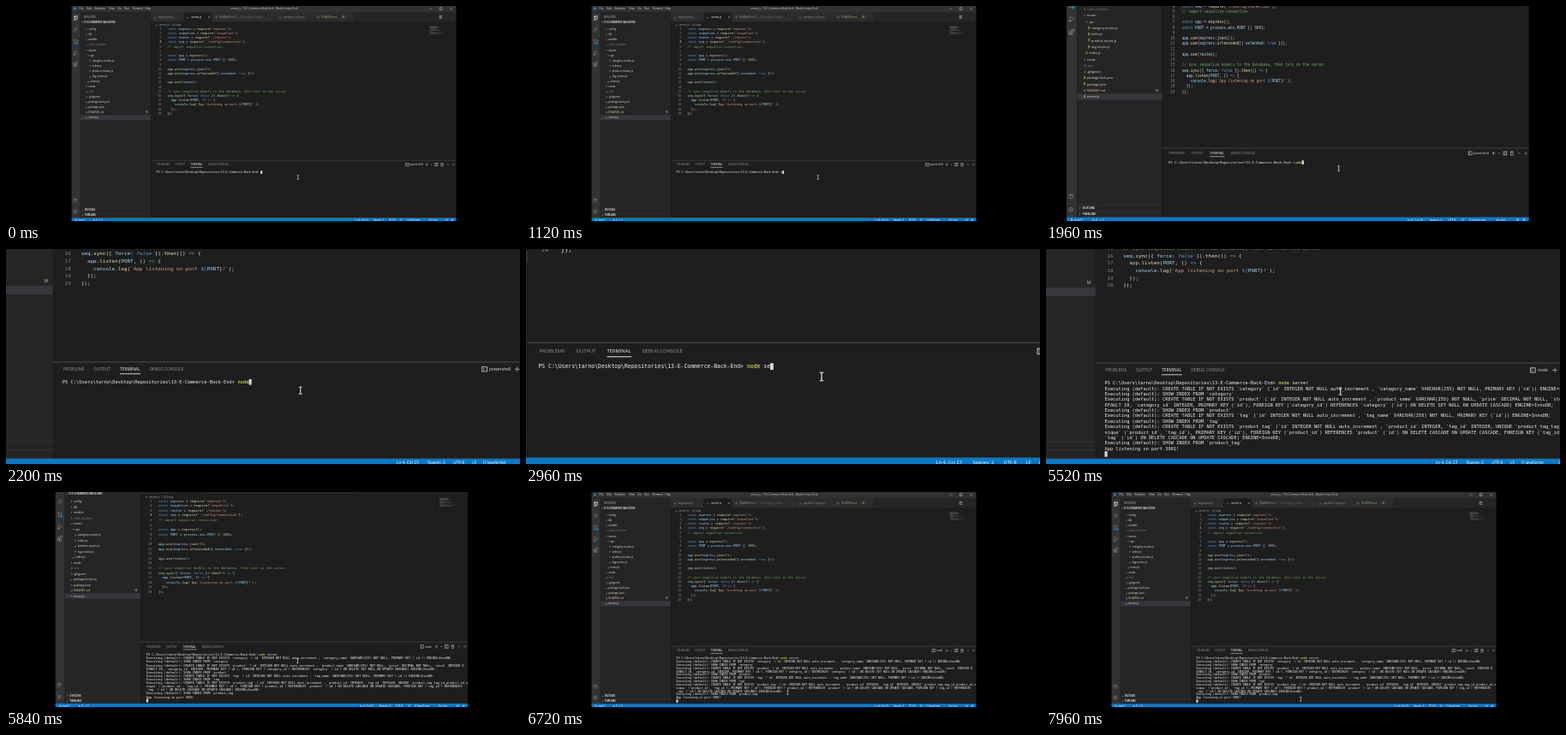
An HTML page with a canvas for the animation above (8000 ms loop, 600 by 251 pixels).

```html
<!DOCTYPE html>
<html lang="en">
<head>
<meta charset="utf-8">
<title>Editor and terminal</title>
<style>
html, body { margin: 0; width: 100%; height: 100%; overflow: hidden; background: #000; }
canvas { display: block; width: 600px; height: 251px; }
</style>
</head>
<body>
<canvas id="stage" width="600" height="251"></canvas>
<script>
const ctx = document.getElementById("stage").getContext("2d");
const LOOP = 8000;
const SANS = '"Open Sans", sans-serif';
const MONO = '"DejaVu Sans Mono", monospace';
const MONO_ADVANCE = 0.602;
const PROMPT = "PS C:\\Users\\tarno\\Desktop\\Repositories\\13-E-Commerce-Back-End> ";
const COMMAND = "node server";
const KEY_TIMES = [1120, 1320, 1520, 1720, 2520, 2680, 2840, 3160, 3400, 3640, 3960];
const ENTER = 4200, OUTPUT = 4720;
const CODE_SIZE = 3.54, TERM_SIZE = 3.21, TERM_LINE = 3.84;

const CODE = [
  "const express = require('express');",
  "const sequelize = require('sequelize');",
  "const routes = require('./routes');",
  "const seq = require('./config/connection');",
  "// import sequelize connection",
  "",
  "const app = express();",
  "const PORT = process.env.PORT || 3001;",
  "",
  "app.use(express.json());",
  "app.use(express.urlencoded({ extended: true }));",
  "",
  "app.use(routes);",
  "",
  "// sync sequelize models to the database, then turn on the server",
  "seq.sync({ force: false }).then(() => {",
  "  app.listen(PORT, () => {",
  "    console.log(`App listening on port ${PORT}!`);",
  "  });",
  "});"
];

const RUN = "Executing (default): ";
const CREATE = RUN + "CREATE TABLE IF NOT EXISTS ";
const ID = " (`id` INTEGER NOT NULL auto_increment , ";
const NAME_END = "_name` VARCHAR(255) NOT NULL, ";
const CASCADE = "ON DELETE CASCADE ON UPDATE CASCADE";
const ENGINE = ") ENGINE=InnoDB;";
const LOG = [
  CREATE + "`category`" + ID + "`category" + NAME_END + "PRIMARY KEY (`id`)" + ENGINE,
  RUN + "SHOW INDEX FROM `category`",
  CREATE + "`product`" + ID + "`product" + NAME_END + "`price` DECIMAL NOT NULL, `stock` INTEGER D",
  "EFAULT 10, `category_id` INTEGER, PRIMARY KEY (`id`), FOREIGN KEY (`category_id`) REFERENCES `category` (`id`) ON DELETE SET NULL ON UPDATE CASCADE" + ENGINE,
  RUN + "SHOW INDEX FROM `product`",
  CREATE + "`tag`" + ID + "`tag" + NAME_END + "PRIMARY KEY (`id`)" + ENGINE,
  RUN + "SHOW INDEX FROM `tag`",
  CREATE + "`product_tag`" + ID + "`product_id` INTEGER, `tag_id` INTEGER, UNIQUE `product_tag_tag_id_product_id_u",
  "nique` (`product_id`, `tag_id`), PRIMARY KEY (`id`), FOREIGN KEY (`product_id`) REFERENCES `product` (`id`) " + CASCADE + ", FOREIGN KEY (`tag_id`) REFERENCES ",
  "`tag` (`id`) " + CASCADE + ENGINE,
  RUN + "SHOW INDEX FROM `product_tag`",
  "App listening on port 3001!"
];

// [indent level, kind, label]; kinds: > closed folder, v open folder, j script, i info, o other
const TREE = [
  [0, ">", "config"], [0, ">", "db"], [0, ">", "models"], [0, ">", "node_modules"],
  [0, "v", "routes"], [1, "v", "api"], [2, "j", "category-routes.js"], [2, "j", "index.js"],
  [2, "j", "product-routes.js"], [2, "j", "tag-routes.js"], [1, "j", "index.js"],
  [0, ">", "seeds"], [0, "o", ".env"], [0, "o", ".gitignore"], [0, "j", "package-lock.json"],
  [0, "j", "package.json"], [0, "i", "README.md"], [0, "j", "server.js"]
];

const clamp01 = v => Math.min(1, Math.max(0, v));
const ramp = (t, from, to) => clamp01((t - from) / (to - from));

function rect(x, y, w, h, color) {
  ctx.fillStyle = color;
  ctx.fillRect(x, y, w, h);
}

function line(color, width, ...points) {
  ctx.strokeStyle = color;
  ctx.lineWidth = width;
  ctx.beginPath();
  for (let i = 0; i < points.length; i += 2) ctx.lineTo(points[i], points[i + 1]);
  ctx.stroke();
}

function circle(x, y, r, color, filled) {
  ctx.beginPath();
  ctx.arc(x, y, r, 0, 7);
  ctx.fillStyle = ctx.strokeStyle = color;
  ctx.lineWidth = 0.5;
  filled ? ctx.fill() : ctx.stroke();
}

function box(x, y, w, h, color) {
  ctx.strokeStyle = color;
  ctx.lineWidth = 0.5;
  ctx.strokeRect(x, y, w, h);
}

// y is the visual middle of the letters; the font is set ten times larger so tiny advances stay exact
function text(str, x, y, color = "#e0e0e0", size = 2.95, font = SANS, style = "", align = "left") {
  ctx.save();
  ctx.translate(x, y + size * 0.35);
  ctx.scale(0.1, 0.1);
  ctx.font = `${style} ${size * 10}px ${font}`;
  ctx.textAlign = align;
  ctx.fillStyle = color;
  ctx.fillText(str, 0, 0);
  ctx.restore();
}

function chevron(x, y, open, color = "#ccc") {
  if (open) line(color, 0.4, x - 0.9, y - 0.5, x, y + 0.5, x + 0.9, y - 0.5);
  else line(color, 0.4, x - 0.5, y - 0.9, x + 0.5, y, x - 0.5, y + 0.9);
}

function cross(x, y, r, color = "#ccc") {
  line(color, 0.4, x - r, y - r, x + r, y + r);
  line(color, 0.4, x - r, y + r, x + r, y - r);
}

function codeLine(str, x, y) {
  const tokens = /(\/\/.*)|('[^']*'|`[^`$]*|!`)|(\bconst\b|=>|\$\{)|(\b(?:true|false)\b)|(\d+)|(\w+)(?=\()|(\w+)|([^\w\s])/g;
  const colors = ["#6fa75e", "#dc9c80", "#569cd6", "#569cd6", "#b5cea8", "#e8e8b4", "#9cdcfe", "#e4e4e4"];
  for (const token of str.matchAll(tokens)) {
    const kind = token.slice(1).findIndex(Boolean);
    const style = kind === 3 ? "italic" : "";
    text(token[0], x + token.index * CODE_SIZE * MONO_ADVANCE, y, colors[kind], CODE_SIZE, MONO, style);
  }
}

function drawTitleBar() {
  rect(76, 0, 449, 7.5, "#323233");
  circle(80, 3, 1.5, "#2489ca", true);
  const menu = { File: 85, Edit: 94, Selection: 103, View: 120, Go: 130, Run: 138, Terminal: 147, Help: 162 };
  for (const [label, x] of Object.entries(menu)) text(label, x, 3);
  text("server.js - 13 E-Commerce Back-End - Marble Script Desk", 301, 3, "#ccc", 3, SANS, "", "center");
  line("#ccc", 0.4, 494, 3.2, 497, 3.2);
  box(506, 1.9, 2.5, 2.5, "#ccc");
  cross(519, 3.1, 1.3);
}

function drawActivityBar() {
  rect(76, 7.5, 10.3, 240, "#333");
  const grey = "#8a8a8a";
  box(78.8, 12.6, 3, 4, "#ddd");
  box(80, 11.6, 3, 4, "#ddd");
  circle(81.2, 27, 1.7, grey);
  line(grey, 0.6, 80, 28.3, 78.4, 30.2);
  circle(79.4, 39.4, 0.8, grey);
  circle(79.4, 43.4, 0.8, grey);
  circle(82.2, 40.2, 0.8, grey);
  line(grey, 0.5, 79.4, 40.2, 79.4, 42.6);
  circle(82.4, 43.4, 1.6, "#007acc", true);
  line(grey, 0.5, 79.4, 52.2, 83.3, 54.8, 79.4, 57.3, 79.4, 52.2);
  circle(79.2, 56.6, 0.9, grey);
  box(78.4, 66.2, 2, 2, grey);
  box(78.4, 68.2, 2, 2, grey);
  box(80.4, 68.2, 2, 2, grey);
  box(81.3, 65, 2, 2, grey);
  circle(80.3, 227, 2.2, grey);
  circle(80.3, 226.4, 0.8, grey);
  circle(80.3, 240, 2, grey);
  circle(80.3, 240, 0.7, grey);
}

function drawSidebar() {
  rect(86.3, 7.5, 82.3, 240, "#252526");
  text("EXPLORER", 90.5, 13, "#bbb", 2.8);
  chevron(88.6, 19, true);
  text("13 E-COMMERCE BACK-END", 90.3, 19, "#ddd", 2.75, SANS, "bold");
  rect(86.3, 127.2, 82.3, 6.1, "#37373d");
  TREE.forEach(([level, kind, label], i) => {
    const y = 27.2 + 6.07 * i, x = 95.8 + level * 2.2;
    const color = kind === "i" ? "#e2c08d" : /node_mod|env/.test(label) ? "#808080" : "#e0e0e0";
    if (kind === ">" || kind === "v") chevron(x - 2.3, y, kind === "v");
    else if (kind === "j") text("JS", x - 3.3, y, "#dada48", 2.1, SANS, "bold");
    else if (kind === "i") circle(x - 2.2, y, 1, "#519aba");
    else line("#7b8a91", 0.4, x - 3, y - 0.5, x - 1.2, y - 0.5, x - 1.2, y + 0.6, x - 3, y + 0.6);
    text(label, x, y, color, 3.05);
  });
  text("M", 162.5, 124, "#e2c08d");
  [["OUTLINE", 238.4], ["TIMELINE", 244.4]].forEach(([label, y]) => {
    line("#3c3c3c", 0.4, 86.3, y - 3, 168.6, y - 3);
    chevron(88.8, y, false);
    text(label, 91.5, y, "#ddd", 2.75, SANS, "bold");
  });
}

function drawEditor() {
  rect(168.6, 7.5, 356.4, 240, "#1e1e1e");
  rect(168.6, 7.5, 356.4, 10.7, "#252526");
  const tabs = [
    [168.6, 207, "tag-routes.js"], [207, 240, "server.js"], [240, 315, "README.md"],
    [315, 359, "product-routes.js"], [359, 405, "README.md"]
  ];
  tabs.forEach(([left, right, label], i) => {
    const active = i === 1, readme = label === "README.md";
    rect(left, 7.5, right - left - 0.4, 10.7, active ? "#1e1e1e" : "#2d2d2d");
    if (readme) circle(left + 5, 13, 1, "#519aba");
    else text("JS", left + 4, 13, "#cbcb41", 2.2, SANS, "bold");
    text(label, left + 8.8, 13, active ? "#fff" : i === 4 ? "#b09a76" : "#999", 3.05);
  });
  cross(236.5, 13, 0.9);
  text("C:\\...\\12 Employee Tracker", 267, 13, "#6c6c6c", 2.7);
  text("M", 392, 13, "#e2c08d");
  box(505.5, 11.7, 2.8, 2.8, "#bbb");
  line("#bbb", 0.4, 506.9, 11.7, 506.9, 14.5);
  text("...", 518, 12.5);
  text("JS", 174, 22, "#cbcb41", 2.2, SANS, "bold");
  text("server.js  ›  [∅] seq", 178, 22, "#aaa");

  ctx.strokeStyle = "#292929";
  ctx.lineWidth = 0.4;
  ctx.strokeRect(185, 39.6, 335, 5.2);
  CODE.forEach((str, i) => {
    const y = 26.6 + 5.21 * i;
    text(i + 1, 181, y, i === 3 ? "#c6c6c6" : "#858585", CODE_SIZE, MONO, "", "right");
    codeLine(str, 188.1, y);
    // minimap
    const indent = str.search(/\S|$/);
    rect(494 + indent * 0.27, 23.5 + i * 0.52, (str.length - indent) * 0.27, 0.3, "#6a6a6a");
  });
}

function drawPanelHeader(running) {
  line("#555", 0.5, 168.6, 180.2, 525, 180.2);
  const tabs = { PROBLEMS: 175.5, OUTPUT: 197, TERMINAL: 215, "DEBUG CONSOLE": 235.5 };
  for (const [label, x] of Object.entries(tabs)) {
    text(label, x, 185.2, label === "TERMINAL" ? "#f5f5f5" : "#999", 2.9);
  }
  line("#e7e7e7", 0.5, 215, 188.4, 229.3, 188.4);
  const iconX = running ? 473.6 : 466.3;
  box(iconX, 183.6, 3.4, 3.2, "#ccc");
  chevron(iconX + 1.2, 185.2, false);
  text(running ? "node" : "powershell", iconX + 5, 185.2);
  line("#ccc", 0.4, 489, 185.2, 492.4, 185.2);
  line("#ccc", 0.4, 490.7, 183.5, 490.7, 186.9);
  chevron(496, 185.2, true);
  box(500.3, 183.6, 3.2, 3.2, "#ccc");
  line("#ccc", 0.4, 501.9, 183.6, 501.9, 186.8);
  box(507.4, 184.2, 2.2, 2.8, "#ccc");
  line("#ccc", 0.4, 506.9, 183.7, 510.1, 183.7);
  line("#ccc", 0.4, 514.5, 185.7, 515.5, 184.6, 516.5, 185.7);
  cross(522, 185.2, 1.1);
}

function drawTerminal(t) {
  const left = 175, top = 194.1, advance = TERM_SIZE * MONO_ADVANCE;
  const write = (str, column, row, color = "#eee") =>
    text(str, left + column * advance, top + row * TERM_LINE, color, TERM_SIZE, MONO);
  const typed = COMMAND.slice(0, KEY_TIMES.filter(key => key <= t).length);
  write(PROMPT, 0, 0);
  write(typed.slice(0, 4), PROMPT.length, 0, "#ffff43");
  write(typed.slice(4), PROMPT.length + 4, 0);

  const shown = t < OUTPUT ? 0 : Math.min(LOG.length, 4 * (1 + Math.floor((t - OUTPUT) / 40)));
  LOG.slice(0, shown).forEach((str, i) => write(str, 0, i + 1));
  const column = t < ENTER ? PROMPT.length + typed.length : 0;
  const row = t < ENTER ? 0 : shown + 1;
  rect(left + column * advance, top + (row - 0.5) * TERM_LINE, advance, TERM_LINE, "#d8d8d8");
}

function drawStatusBar() {
  rect(76, 247.2, 449, 5, "#007acc");
  const items = {
    "main*": 83.5, "⊗ 0  ⚠ 0": 101, "Ln 4, Col 23": 407, "Spaces: 2": 428.5, "UTF-8": 446.5,
    LF: 459.5, "{} JavaScript": 467, "Go Live": 493
  };
  for (const [label, x] of Object.entries(items)) text(label, x, 249.9, "#fff", 2.85);
  circle(81, 249.8, 0.8, "#fff");
  circle(514, 249.8, 0.9, "#fff");
  circle(520.5, 249.8, 0.9, "#fff");
}

function drawPointer(t) {
  const p = ramp(t, 5740, 7100), move = p * p * (3 - 2 * p);
  const x = 340.3 - 43.5 * move, y = 200 + 42 * move;
  line("#eee", 0.6, x, y - 2.3, x, y + 2.3);
  line("#eee", 0.5, x - 1.2, y - 2.4, x + 1.2, y - 2.4);
  line("#eee", 0.5, x - 1.2, y + 2.4, x + 1.2, y + 2.4);
}

function draw() {
  const t = performance.now() % LOOP;
  const zoom = 1 + ramp(t, 1860, 2360) - ramp(t, 5340, 5880);
  ctx.setTransform(1, 0, 0, 1, 0, 0);
  rect(0, 0, 600, 251, "#000");
  // zoom about a fixed point on the bottom edge
  ctx.setTransform(zoom, 0, 0, zoom, 336 * (1 - zoom) + 0.5, 251 * (1 - zoom));
  drawEditor();
  drawTitleBar();
  drawActivityBar();
  drawSidebar();
  drawPanelHeader(t >= OUTPUT);
  drawTerminal(t);
  drawStatusBar();
  drawPointer(t);
  requestAnimationFrame(draw);
}
draw();
</script>
</body>
</html>
```
